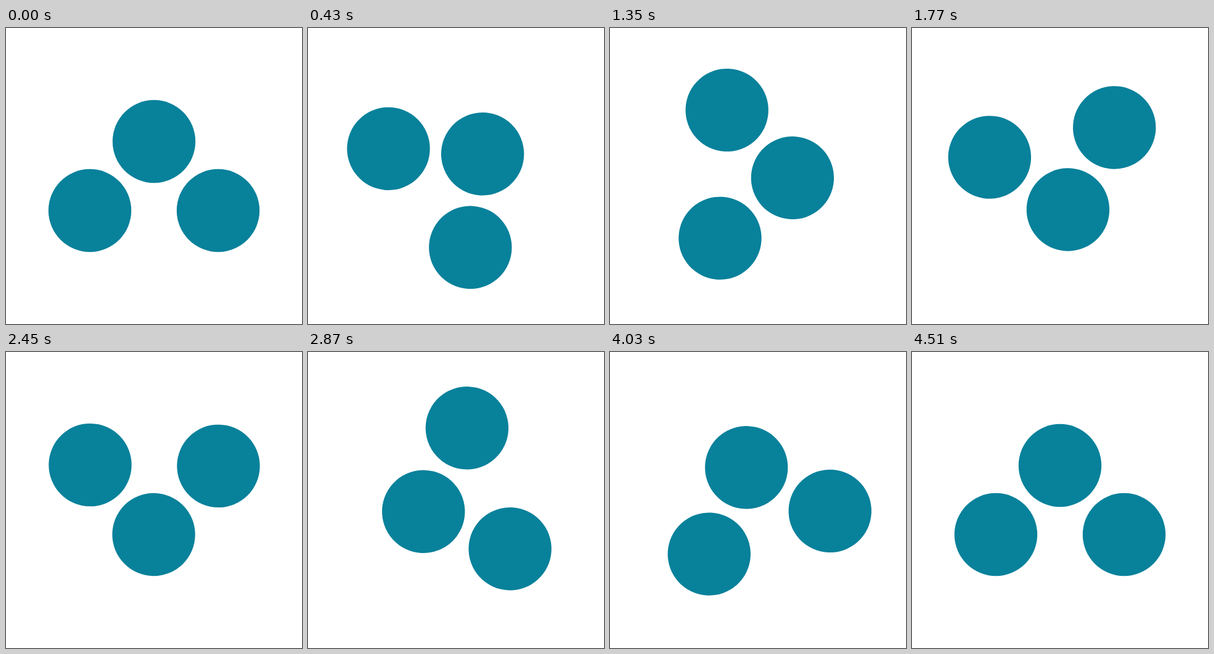
Recreate the animation shown at these times as an HTML page. Size 480x480 px, loop 4.71 s.

```html
<!DOCTYPE html>
<html lang="en">
<head>
<meta charset="utf-8">
<title>Turning dots</title>
<style>
  html, body { margin: 0; width: 100%; height: 100%; overflow: hidden; background: #fff; }
  svg { display: block; width: 100%; height: 100%; }
</style>
</head>
<body>
<svg viewBox="-240 -240 480 480">
  <g id="dots" fill="#08819b">
    <circle cx="0" cy="-56" r="67.2"/>
    <circle cx="-104" cy="56" r="67.2"/>
    <circle cx="104" cy="56" r="67.2"/>
  </g>
</svg>
<script>
  const LOOP = 4710;   // ms
  const FIRST = 130;   // first visible step of the first turn
  const PERIOD = 1160; // from one quarter turn to the next
  const STEP = 60;
  const STEPS = 16;
  const LEAD = 44;     // time already run at a turn's first step
  const TURN = 918;

  const dots = document.getElementById('dots');
  const bezier = (a, b, t) => 3 * a * t * (1 - t) ** 2 + 3 * b * t * t * (1 - t) + t ** 3;

  // cubic-bezier(.4, 0, .2, 1), solved by bisection
  function ease(x) {
    if (x >= 1) return 1;
    let lo = 0, hi = 1;
    for (let i = 0; i < 30; i++) {
      const mid = (lo + hi) / 2;
      if (bezier(0.4, 0.2, mid) < x) lo = mid;
      else hi = mid;
    }
    return bezier(0, 1, lo);
  }

  function angleAt(time) {
    const t = time % LOOP - FIRST;
    if (t < 0) return 0;
    const turn = Math.floor(t / PERIOD);
    const step = Math.min(STEPS - 1, Math.floor((t - turn * PERIOD) / STEP));
    return 90 * (turn + ease((step * STEP + LEAD) / TURN));
  }

  const start = performance.now();
  function draw() {
    const angle = angleAt(performance.now() - start);
    dots.setAttribute('transform', `rotate(${angle})`);
    requestAnimationFrame(draw);
  }
  draw();
</script>
</body>
</html>
```
